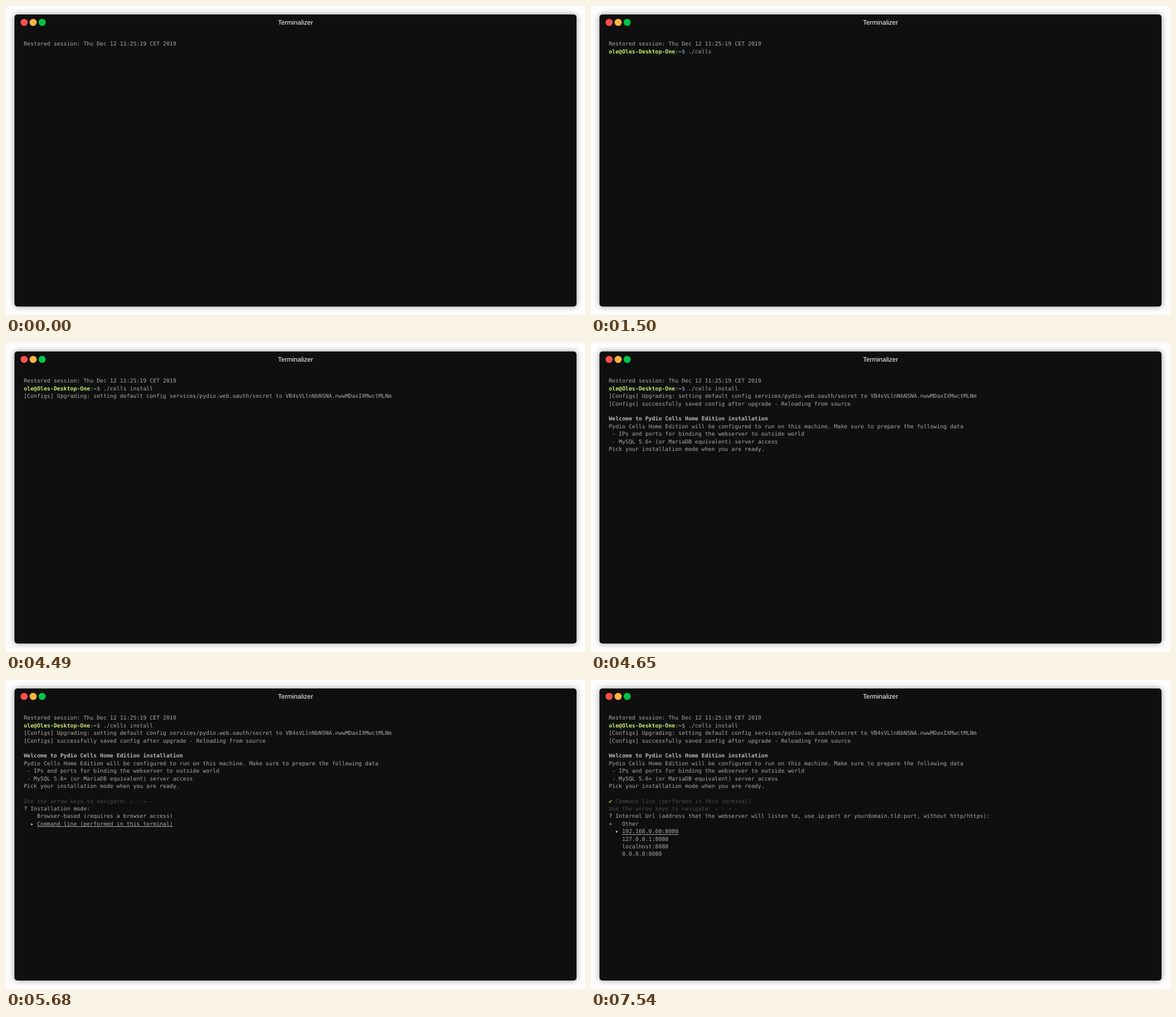
An HTML page with a canvas that plays this animation: 1024x547 px, repeating every 8000 ms.

```html
<!DOCTYPE html>
<html lang="en">
<head>
<meta charset="utf-8">
<title>Terminal session</title>
<style>
  html, body { margin: 0; width: 100%; height: 100%; overflow: hidden; background: #fdfdfd; }
  canvas { display: block; width: 1024px; height: 547px; }
</style>
</head>
<body>
<canvas id="stage" width="1024" height="547"></canvas>
<script>
const LOOP = 8000;
const CELL = 5.86, ROW = 13.39, LEFT = 31.5, BASE = 70.4;
const MONO = '"DejaVu Sans Mono", monospace';
const ctx = document.getElementById('stage').getContext('2d');

const STYLES = {
  text: { color: '#a9a9a9' },
  strong: { color: '#b8b8b8', bold: true },
  faint: { color: '#4c4c4c' },
  ghost: { color: '#2c2c2c' },
  green: { color: '#c8ed71', bold: true },
  check: { color: '#b3e33b' },
  blue: { color: '#8fdcec', bold: true },
  mark: { color: '#d0d0d0' },
  link: { color: '#a9a9a9', underline: true }
};

// A line is a list of [text, style] spans.
const plain = text => [[text, 'text']];

const header = plain('Restored session: Thu Dec 12 11:25:19 CET 2019');
const prompt = command => [
  ['ole@Oles-Desktop-One', 'green'], [':', 'text'], ['~', 'blue'], ['$ ' + command, 'text']
];
const hint = [
  ['Use the arrow keys to navigate: ↓ ', 'faint'], ['↑ ', 'ghost'], ['→ ', 'faint'], ['←', 'ghost']
];
const question = text => [['?', 'mark'], [' ' + text, 'text']];
const option = (text, active, lead = ' ') => active
  ? [[lead + ' ', 'text'], ['▸', 'mark'], [' ', 'text'], [text, 'link']]
  : plain(lead + '   ' + text);

const TYPING = [
  [280, ''], [1060, '.'], [1130, './'], [1240, './c'], [1440, './ce'], [1500, './cells '],
  [1930, './cells i'], [2040, './cells in'], [2160, './cells ins'], [2390, './cells install']
];

const WELCOME = [
  [],
  [['Welcome to Pydio Cells Home Edition installation', 'strong']],
  plain('Pydio Cells Home Edition will be configured to run on this machine. Make sure to prepare the following data'),
  plain(' - IPs and ports for binding the webserver to outside world'),
  plain(' - MySQL 5.6+ (or MariaDB equivalent) server access'),
  plain('Pick your installation mode when you are ready.'),
  []
];
const MODES = ['Browser-based (requires a browser access)', 'Command line (performed in this terminal)'];
const HOSTS = ['Other', '192.168.0.60:8080', '127.0.0.1:8080', 'localhost:8080', '0.0.0.0:8080'];

function screenAt(t) {
  const lines = [header];
  const typed = TYPING.filter(([start]) => t >= start).pop();
  if (typed) lines.push(prompt(typed[1]));
  if (t >= 4490) lines.push(plain('[Configs] Upgrading: setting default config services/pydio.web.oauth/secret to VB4sVLlnNbNSNA.nwwMDaxIXMwctMLNm'));
  if (t >= 4550) lines.push(plain('[Configs] successfully saved config after upgrade - Reloading from source'));
  if (t >= 4650) lines.push(...WELCOME);
  if (t >= 6580) {
    const chosen = t >= 7540 ? 1 : 0;
    lines.push(
      [['✔', 'check'], [' ' + MODES[1], 'faint']],
      hint,
      question('Internal Url (address that the webserver will listen to, use ip:port or yourdomain.tld:port, without http/https):'),
      ...HOSTS.map((host, i) => option(host, i === chosen, i ? ' ' : '+'))
    );
  } else if (t >= 4730) {
    const chosen = t >= 5680 ? 1 : 0;
    lines.push(hint, question('Installation mode:'), ...MODES.map((mode, i) => option(mode, i === chosen)));
  }
  return lines;
}

function drawWindow() {
  ctx.fillStyle = '#fdfdfd';
  ctx.fillRect(0, 0, 1024, 547);
  ctx.save();
  ctx.shadowColor = 'rgba(0, 0, 0, 0.4)';
  ctx.shadowBlur = 11;
  ctx.fillStyle = '#0f0f0f';
  ctx.beginPath();
  ctx.roundRect(15, 15, 994, 517, 5);
  ctx.fill();
  ctx.restore();

  ['#ff4f4d', '#feb43c', '#00c445'].forEach((color, i) => {
    ctx.fillStyle = color;
    ctx.beginPath();
    ctx.arc(32 + 16 * i, 29, 6.3, 0, Math.PI * 2);
    ctx.fill();
  });

  ctx.font = '11.5px "Liberation Sans", Arial, sans-serif';
  ctx.textAlign = 'center';
  ctx.fillStyle = '#fff';
  ctx.fillText('Terminalizer', 512, 33.4);
}

function drawLine(spans, row) {
  const y = BASE + row * ROW;
  let col = 0;
  for (const [text, name] of spans) {
    const style = STYLES[name];
    ctx.font = `${style.bold ? 'bold ' : ''}9.73px ${MONO}`;
    ctx.fillStyle = style.color;
    if (style.underline) {
      ctx.fillRect(LEFT + col * CELL, Math.round(y + 1.3), text.length * CELL, 1);
    }
    for (const char of text) {
      if (char !== ' ') ctx.fillText(char, LEFT + col * CELL, y);
      col++;
    }
  }
}

function render(now) {
  drawWindow();
  ctx.textAlign = 'left';
  screenAt(now % LOOP).forEach(drawLine);
}

const start = performance.now();
function tick() {
  render(performance.now() - start);
  requestAnimationFrame(tick);
}
ctx.textRendering = 'geometricPrecision';
tick();
</script>
</body>
</html>
```
